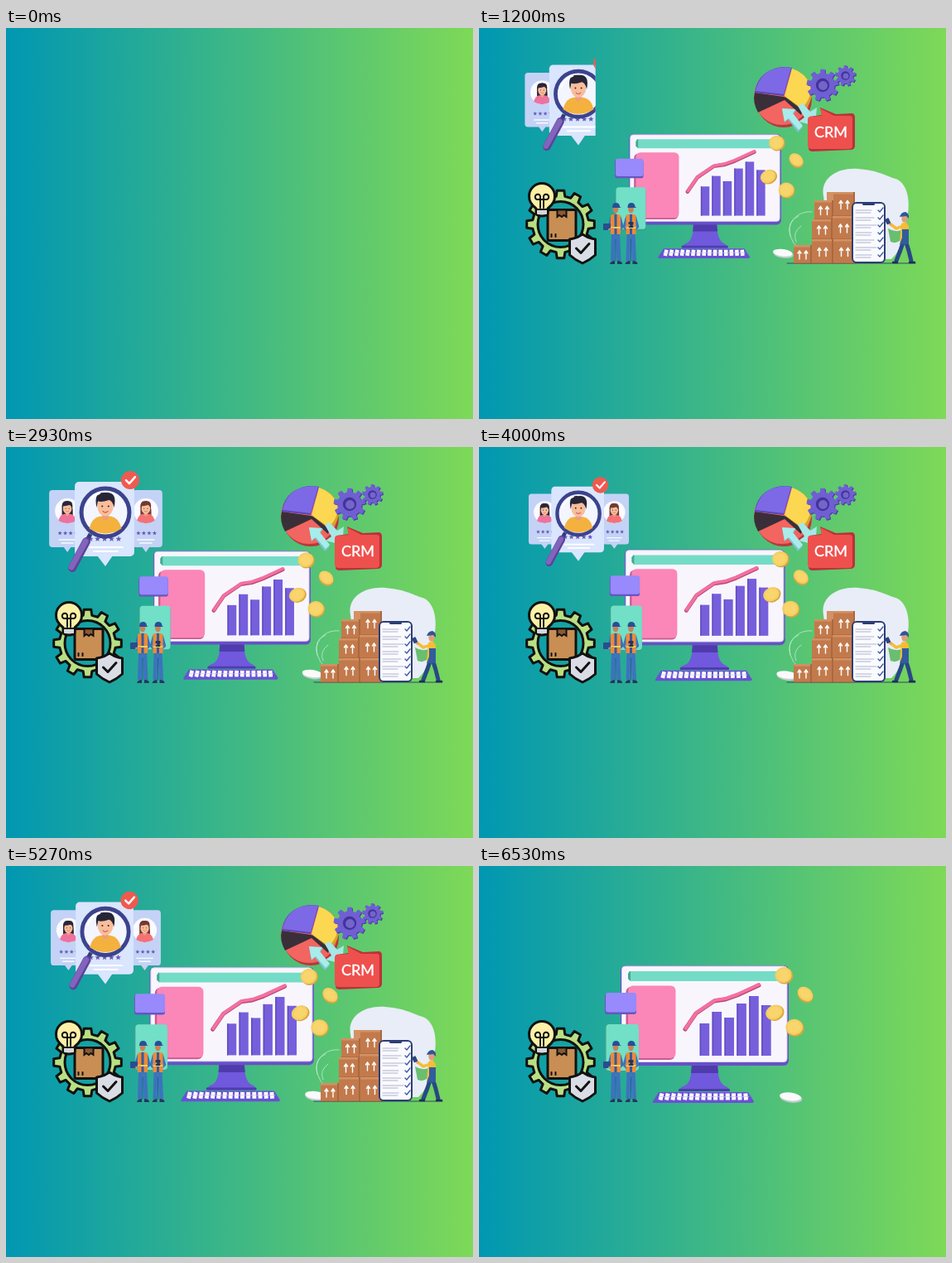
Animation of 564 by 472 pixels, one loop 6.59 s. Source, as an HTML page:

```html
<!DOCTYPE html>
<html lang="en">
<head>
<meta charset="utf-8">
<title>Business dashboard</title>
<style>
  html, body { margin: 0; width: 100%; height: 100%; overflow: hidden; }
  body { background: linear-gradient(90deg, #0097b2, #7ed957); }
  svg { display: block; width: 564px; height: 472px; }
</style>
</head>
<body>
<svg id="stage" viewBox="0 0 564 472"></svg>
<script>
const LOOP = 6590, STEPS = 99, STEP = 200 / 3, SPAN = 1000 / 3;
const stage = document.getElementById('stage');

// Shape helpers
const rect = (x, y, w, h, fill, r = 0, more = '') =>
  `<rect x="${x}" y="${y}" width="${w}" height="${h}" rx="${r}" fill="${fill}" ${more}/>`;
const oval = (x, y, rx, ry, fill, more = '') =>
  `<ellipse cx="${x}" cy="${y}" rx="${rx}" ry="${ry}" fill="${fill}" ${more}/>`;
const disc = (x, y, r, fill, more) => oval(x, y, r, r, fill, more);
const path = (d, fill, more = '') => `<path d="${d}" fill="${fill}" ${more}/>`;
const line = (d, color, width = 1, cap = 'round') =>
  path(d, 'none', `stroke="${color}" stroke-width="${width}" stroke-linecap="${cap}" stroke-linejoin="round"`);
const at = (x, y, body, k = 1) => `<g transform="translate(${x} ${y}) scale(${k})">${body}</g>`;
const repeat = (n, draw) => Array.from({ length: n }, (_, i) => draw(i)).join('');
const outline = 'stroke="#111" stroke-width="3" stroke-linejoin="round"';

function ringPath(cx, cy, points, radius) {
  let d = '';
  for (let i = 0; i < points; i++) {
    const [r, a] = radius(i);
    d += `${i ? 'L' : 'M'}${(cx + r * Math.cos(a)).toFixed(1)} ${(cy + r * Math.sin(a)).toFixed(1)}`;
  }
  return d + 'Z';
}
function gearPath(cx, cy, inner, outer, teeth) {
  const step = 2 * Math.PI / teeth, offsets = [-.3, -.2, .2, .3];
  return ringPath(cx, cy, teeth * 4, i =>
    [i % 4 === 1 || i % 4 === 2 ? outer : inner, step * (Math.floor(i / 4) + offsets[i % 4]) - Math.PI / 2]);
}
const star = (x, y, r) => path(ringPath(x, y, 10, i =>
  [i % 2 ? r * .42 : r, i * Math.PI / 5 - Math.PI / 2]), '#6759b4');

function monitor() {
  const tops = [190, 176, 183, 166, 157, 168];
  const coin = (x, y, rx, ry, turn) => `<g transform="translate(${x} ${y}) rotate(${turn})">` +
    oval(.7, .7, rx, ry, '#d6a740') + oval(-.3, -.5, rx - .4, ry - .6, '#f6cf62') +
    oval(-.3, -.5, rx - 3, ry - 3, '#f9d56d') + '</g>';
  return path('M257 239H288Q288 260 296 265Q303 268 303 272H241Q242 267 249 265Q257 260 257 239Z', '#7059dd') +
    path('M257 239H288L289 250H256Z', '#503bad') + rect(241, 269, 62, 3, '#4f3caf', 1) +
    rect(171, 120, 203, 121, '#6651c6', 6) + rect(172.5, 121, 199.5, 115.5, '#f8f6fc', 4) +
    rect(172.5, 121, 199.5, 115.5, 'none', 4, 'stroke="#d9d2f4"') +
    path('M182 127H369Q372 127 372 131V136Q372 139 369 139H183L180 136V130Z', '#74dcc6') +
    path('M182 127L180 130V136L183 139V127Z', '#43a894') +
    rect(177.5, 146, 59, 88, '#cb5b91', 6) + rect(180, 144.5, 57.5, 87.5, '#fb86b8', 6) +
    rect(152, 154, 38, 25, '#6756c1', 3) + rect(153, 153, 37, 23.5, '#9889fc', 3) +
    rect(152, 192, 41, 57, '#3ba28e', 4) + rect(153.5, 191, 39.5, 56, '#72dfc7', 4) +
    repeat(6, i => rect(266.7 + i * 14.9, tops[i], 11.5, 229 - tops[i], '#775fdc') +
      rect(266.7 + i * 14.9, tops[i], 1.5, 229 - tops[i], '#604ac0')) +
    line('M249 197L262 178L284 163L298 161L312 156L338 144', '#ba4679', 5) +
    line('M249.5 196L262.5 177L285 162L298 160L312 155L338 143', '#f4709f', 4) +
    path('M217 273H325L332 284Q332 286 330 286H211Q209 286 210 284Z', '#6951d3') +
    repeat(15, i => line(`M${221 + i * 7.2} 274.5L${219 + i * 7.4} 282.5`, '#fff', 5, 'butt')) +
    line('M217 278.5H326', '#c5bbef', .7) +
    coin(368, 132, 10.5, 10, -15) + coin(394, 155, 10.5, 8.3, 40) +
    coin(357, 177, 11, 9.2, -25) + coin(381, 195, 10.8, 10.3, 0) +
    `<g transform="rotate(7 377 279)">${oval(377, 280, 13.5, 5.5, '#c5ccd0')}${oval(376, 278.5, 13, 4.8, '#fafafa')}</g>`;
}

function qualityGear() {
  return path(gearPath(98.5, 237, 34, 41, 12) + 'M126 237A27.500 27.500 0 1 0 71 237A27.500 27.500 0 1 0 126 237Z',
      '#b9df83', outline + ' fill-rule="evenodd"') +
    rect(83, 219.5, 34, 37, '#c98e54', 2, outline) +
    path('M94.500 219.500H105.500V228L102.500 226L100 228L97 226L94.500 228Z', '#8d5930', 'stroke="#111" stroke-width="2"') +
    line('M87.500 249V252M92.500 249V252', '#111', 2) +
    path('M69 218Q60 211 60.500 203A15.500 15.500 0 0 1 91.500 203Q92 211 83 218V224Q82 227 76 227Q70 227 69 224Z', '#fdf1a7', outline) +
    rect(70, 219, 12, 6, '#d6d8df', 1) + line('M70 219H82', '#111', 2) +
    line('M74 217V207H70A3.200 3.200 0 1 1 74 203V207H78V203A3.200 3.200 0 1 1 82 207H78V217', '#111', 2) +
    path('M125 249Q132 254 140.500 255V274Q134 280 125 284Q116 280 109.500 274V255Q118 254 125 249Z', '#dadde5', outline) +
    line('M117.500 266L123 271.500L133 260.500', '#111', 3);
}

function worker(prop) {
  return line('M-2.500 33L-3.500 66M2.500 33L4 66', '#3d73bd', 5, 'butt') + line('M0 40V66', '#284e91', .8) +
    path('M-7 70Q-6 66 -1 66V70ZM2 70V66Q8 66 8 70Z', '#26365e') +
    line('M-5 14L-8 25L-4 30M5 14L8 25L3 29', '#3a72ba', 3.5) +
    path('M-6 11Q0 8 6 11L6 34H-6Z', '#ef8937') + rect(-1.5, 10, 3, 24, '#355b9d') +
    line('M-6 26H6', '#f4d05b', 2, 'butt') + oval(0, 3.5, 3.4, 4.8, '#c98159') +
    path('M-4 2Q-4 -4 0 -4Q5 -4 5 1L7 2H-4Z', '#254f98') + prop;
}
function workers() {
  return at(165, 215, worker(rect(-15, 21, 9, 8, '#284d90', 1) + line('M-8 28L-3 27', '#cf8d64', 2))) +
    at(183.5, 215, worker(rect(-3, 19, 6, 7, '#243657', 1) + line('M-6 25L-2 23M6 25L3 23', '#cf8d64', 2)));
}

function crm() {
  const gear = (x, y, r, n) => path(gearPath(x + 1, y + 1, r * .76, r, n), '#4a3aa4') +
    path(gearPath(x, y, r * .76, r, n), '#705fd2') + disc(x, y, r * .42, '#43339a') + disc(x + .5, y + .5, r * .28, '#7466c8');
  return disc(368, 86, 34, '#b9383c') + disc(366, 83, 34, '#f26560') +
    path('M368 83L333 78Q330 89 337 102L369 87L389 105L393 92Z', '#3a2f38') +
    path('M368 82L333 78Q336 58 352 51Q364 45 378 48Z', '#5845b8') +
    path('M368 80L334 76Q338 57 354 50Q366 46 377 48Z', '#7d69e6') +
    path('M371 84L380 50Q397 56 402 72Q404 88 392 100Z', '#d5a52a') +
    path('M369 82L378 49Q394 54 400 69Q403 83 390 97Z', '#fcd751') +
    path('M366 98L383 99L379.500 104L391 120L385 126L373 110L369 114Z', '#7cc4cd') +
    path('M366 97L382 98L379 103L391 118L386 123L374 109L369 113Z', '#a9ecec') +
    path('M385 94L391 91L400 101L408 96L406 118L386 113L393 108Z', '#a5e8e8') +
    gear(415, 69, 19.500, 9) + gear(442.500, 57.500, 12.500, 9) +
    path('M399 107L414 105L412 96L431 104L451 103Q454 104 454 108V143Q453 147 449 147L403 149Q398 149 398 145Z', '#b9323a') +
    path('M400 107L414 106L412 97L429 106H448Q451 106 451 110V142Q451 146 447 146H402Q397 146 397 142V111Q397 107 400 107Z', '#ee504d') +
    '<text x="425" y="132" text-anchor="middle" font-family="Lato, sans-serif" font-size="18" fill="#fff" stroke="#fff" stroke-width=".4">CRM</text>';
}

function warehouse() {
  const box = (x, y, w, h) => rect(x, y, w, h, '#c27a4c') + rect(x, y, w, 2.5, '#d39164') +
    rect(x + w - 2, y, 2, h, '#aa683f') + line(`M${x} ${y + h}H${x + w}`, '#95573a', .7) +
    repeat(2, i => {
      const ax = x + w / 2 - 4 + i * 8, ay = y + h / 2 - 4;
      return line(`M${ax} ${ay + 10}V${ay}M${ax - 2} ${ay + 3}L${ax} ${ay}L${ax + 2} ${ay + 3}`, '#fff', 1.4);
    });
  const row = i => line(`M455 ${220 + i * 9}H${474 + i % 3 * 3}M455 ${223 + i * 9}H473`, '#a5aac7', .9) +
    line(`M482 ${220 + i * 9}L484 ${222 + i * 9}L488 ${217 + i * 9}`, '#3e56a5', 1.3);
  return path('M416 203C412 182 432 168 458 170C482 172 490 178 503 182C520 188 522 216 515 236C514 256 508 270 498 279H426Z', '#e8edf7') +
    line('M402 222C385 220 371 235 376 251Q382 270 401 270', '#c3ead0', .8) +
    line('M376 251Q371 233 386 227M383 258Q378 247 389 239', '#c3ead0', .8) +
    line('M372 284H527', '#344466', 1) +
    box(405, 208, 23, 23) + box(428, 198, 26, 29) + box(402, 231, 25, 24) + box(427, 227, 27, 28) +
    box(380, 262, 22, 22) + box(402, 255, 26, 29) + box(428, 255, 27, 29) +
    rect(420, 198, 8, 10, '#d39164') +
    rect(450, 210, 41, 74, '#2d3e75', 6) + rect(452, 212, 37, 70, '#fafbff', 4) + rect(463, 211, 15, 3, '#2d3e75', 1.5) +
    repeat(7, row) + path('M494 242Q502 247 511 244L509 256Q504 261 497 258Z', '#69be70') +
    line('M513 256L509 268L504 281M515 256L519 269L522 281', '#294985', 5) +
    line('M500 283H505M520 283H526', '#1d2e59', 2.5) +
    path('M510 236Q517 233 519 240L519 259H508Z', '#f6bd36') + path('M511 243H519V261H508L511 253Z', '#315c9e') +
    line('M512 239L504 242L496 236', '#f6bd36', 3.5) + line('M497 237L494 234', '#df9e7b', 3) +
    rect(491, 230, 5, 7, '#2b477e', 1, 'transform="rotate(-25 493 233)"') +
    oval(514, 230, 3.7, 4.8, '#df9e7b') + path('M508 228Q510 222 515 222Q520 224 519 230L516 227Z', '#2d5798');
}

function customers() {
  const face = (hair, shirt, long) => (long ? path('M-8 10V-4Q-8 -12 0 -12Q9 -12 8 10Z', hair) : '') +
    path('M-13 17Q-11 8 -4 7H4Q11 8 13 17Q0 25 -13 17Z', shirt) + rect(-2.5, 3, 5, 7, '#ed9d7d', 2) +
    oval(0, -1, 6.5, 8, '#f9bd99') + path('M-7 0Q-10 -13 0 -12Q10 -13 7 0Q6 -5 3 -6Q-3 -4 -6 -5Z', hair) +
    disc(-2.5, -1, .7, '#2b2638') + disc(2.5, -1, .7, '#2b2638') + line('M-2 3Q0 5 2 3', '#c86260', .8);
  const card = (x, cx, who) => rect(x, 52, 36, 69, '#c4d2f6', 4) + path(`M${cx - 5} 120H${cx + 5}L${cx} 127Z`, '#c4d2f6') +
    disc(cx, 77, 15, '#fafaff') + at(cx, 75, who, .82) +
    repeat(4, i => star(cx - 9 + i * 6.5, 104, 2.8)) + line(`M${cx - 10} 112H${cx + 10}M${cx - 7} 116H${cx + 7}`, '#f8faff', 1.5);
  return card(52, 74, face('#2b2639', '#ee729e', true)) + card(153, 169, face('#713a33', '#f47276', true)) +
    rect(83, 42, 72, 90, '#dae5fe', 5) + path('M110 131H129L120 144Z', '#dae5fe') +
    repeat(5, i => star(102 + i * 8.5, 111, 3.7)) + line('M101 121H141M106 126H135', '#fff', 2) +
    line('M102 105L97 114', '#343c80', 5, 'butt') + line('M97 114L80 146', '#5b4399', 10) + line('M96 114L79 145', '#8364bd', 7) +
    disc(120, 79, 29, '#f3f5ff', 'stroke="#3c438d" stroke-width="5"') + at(120, 73, face('#272638', '#f4b13e'), 1.5) +
    line('M98 71Q102 59 113 56', '#fff', 2) +
    disc(150, 40, 11, '#ef5a50') + line('M145 40L149 44L156 36', '#fff', 2.5);
}

// Parts fade in and out in turn; the customer cards wipe and the workers rise.
const parts = [
  { draw: monitor, start: 0 },
  { draw: qualityGear, start: 2 * STEP },
  { draw: workers, start: 10 * STEP, rise: 12 },
  { draw: warehouse, start: 8 * STEP, end: 6100 },
  { draw: crm, start: 5 * STEP, end: 5867 },
  { draw: customers, start: 16 * STEP, end: 17 * SPAN, wipe: true }
];
stage.innerHTML = '<clipPath id="wipe"><rect id="window" y="0" height="472"/></clipPath>' + parts.map(p =>
  `<g ${p.wipe ? 'clip-path="url(#wipe)"' : ''}><g class="part">${p.draw()}</g></g>`).join('');
const bodies = stage.querySelectorAll('.part');
const wipeWindow = document.getElementById('window');
const clamp = v => Math.max(0, Math.min(1, v));
const scaleAt = (el, x, y, k) =>
  el.setAttribute('transform', `translate(${x} ${y}) scale(${k}) translate(${-x} ${-y})`);

function frame(now) {
  const t = Math.floor((now % LOOP) / LOOP * STEPS) * STEP;
  // The cards rest at their middle size until they start to pulse.
  const beat = Math.max(t, 1195) - 70;
  const pulse = (1 + .11 * Math.cos(beat / 900 * 2 * Math.PI)) / 1.048;
  scaleAt(bodies[0], 279, 203.5, .883 + .0179 * t / 1000);
  scaleAt(bodies[5], 120.5, 91, pulse);
  parts.forEach((p, i) => {
    const shown = 1 - (1 - clamp((t - p.start) / SPAN)) ** 2;
    const hidden = p.end ? clamp((t - p.end) / SPAN) ** 2 : 0;
    if (p.wipe) {
      const width = 141 * pulse;
      wipeWindow.setAttribute('x', 120.5 - 69 * pulse + width * hidden);
      wipeWindow.setAttribute('width', width * Math.max(0, shown - hidden));
    } else {
      bodies[i].setAttribute('opacity', shown * (1 - hidden));
    }
    if (p.rise) bodies[i].setAttribute('transform', `translate(0 ${p.rise * (1 - shown)})`);
  });
  requestAnimationFrame(frame);
}
requestAnimationFrame(frame);
</script>
</body>
</html>
```
